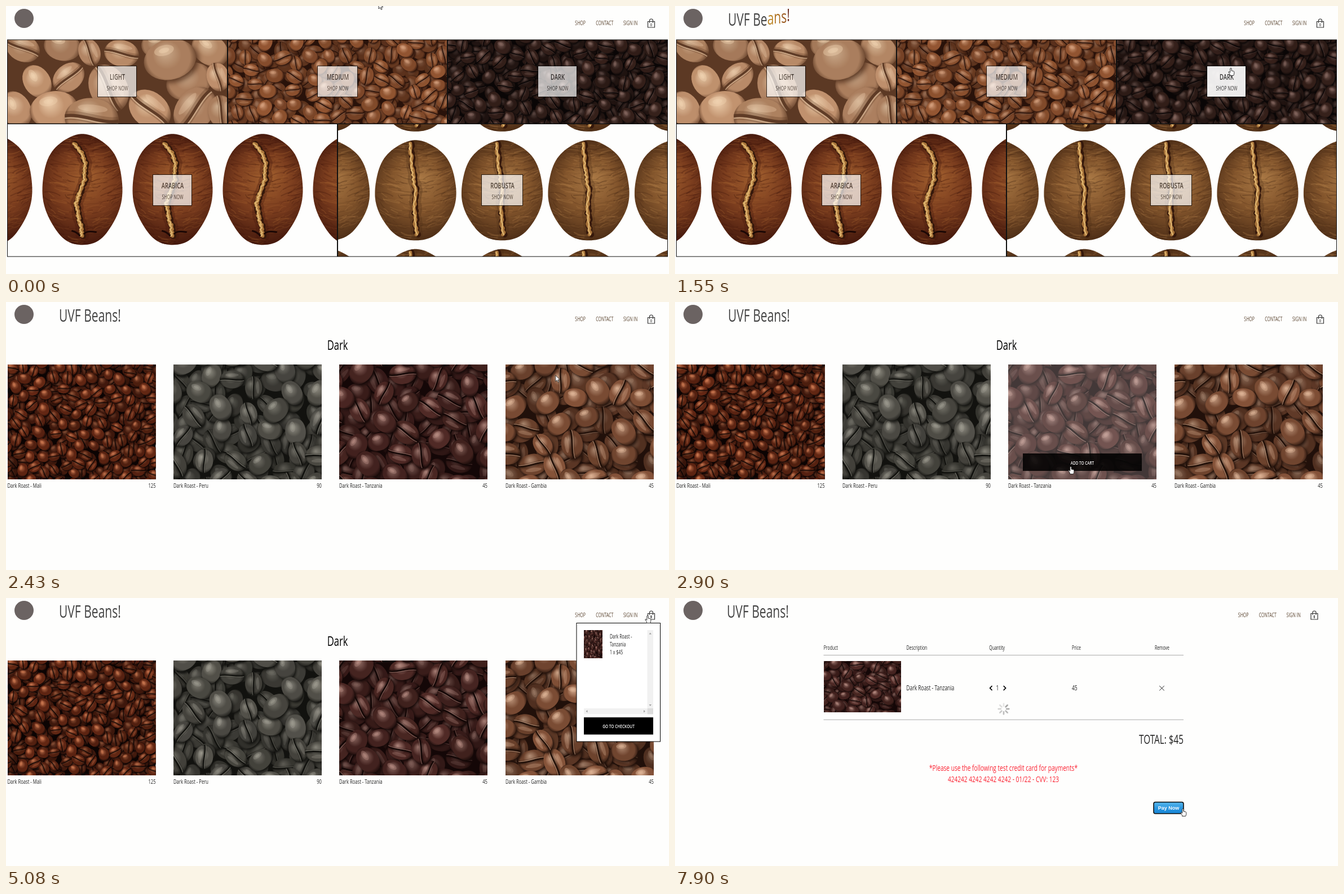
Animation, 1176 px wide and 476 px high, one loop 7.99 s. Source, as an HTML page with a canvas:

```html
<!DOCTYPE html>
<html lang="en">
<head>
<meta charset="utf-8">
<title>Coffee shop</title>
<style>
  html, body { margin: 0; width: 100%; height: 100%; overflow: hidden; background: #fefefd; }
  #stage { position: relative; width: 1176px; height: 476px; overflow: hidden; font-family: "Open Sans", sans-serif; --loop: 7990ms; }
  #stage > *, .scene > * { position: absolute; left: 0; top: 0; }
  svg { display: block; overflow: visible; }
  .scene { width: 1176px; height: 476px; }
  .hard { animation: var(--name) var(--loop) step-end infinite; }

  #home { --name: home; } #load { --name: load; } #shop { --name: shop; } #cart { --name: cart; }
  @keyframes home { 0% { opacity: 1 } 22.7%, 100% { opacity: 0 } }
  @keyframes load { 0% { opacity: 0 } 22.7% { opacity: 1 } 29.4%, 100% { opacity: 0 } }
  @keyframes shop { 0% { opacity: 0 } 29.4% { opacity: 1 } 70.5%, 100% { opacity: 0 } }
  @keyframes cart { 0% { opacity: 0 } 70.5%, 100% { opacity: 1 } }

  #home .dark { left: 784px; top: 60px; width: 389px; height: 149px; overflow: hidden; }
  .dark canvas { animation: zoom var(--loop) linear infinite; }
  @keyframes zoom { 0%, 13% { transform: none } 22.7%, 100% { transform: scale(1.025) } }
  .tag { opacity: .7; }
  .tag.hot { --name: tag; }
  @keyframes tag { 0% { opacity: .7 } 13%, 100% { opacity: .92 } }

  .ring { transform-origin: 588px 234.5px; animation: spin 998.75ms -37ms linear infinite; }
  .spokes { transform-origin: 583px 197px; animation: spin 998.75ms steps(8) infinite; }
  @keyframes spin { to { transform: rotate(360deg) } }

  .buy { --name: buy; }
  @keyframes buy { 0% { opacity: 0 } 32.6% { opacity: 1 } 44.3%, 100% { opacity: 0 } }
  #menu { --name: menu; }
  @keyframes menu { 0% { opacity: 0 } 55.2%, 100% { opacity: 1 } }
  #menu canvas { position: absolute; left: 1025px; top: 57px; }
  .paid { --name: paid; }
  @keyframes paid { 0% { opacity: 0 } 94%, 100% { opacity: 1 } }
  .none { --name: none; } .one { --name: one; }
  @keyframes none { 0% { opacity: 1 } 38.2%, 100% { opacity: 0 } }
  @keyframes one { 0% { opacity: 0 } 38.2%, 100% { opacity: 1 } }

  #nav { --name: nav; }
  @keyframes nav { 0% { transform: none } 70.5%, 100% { transform: translateX(-10.5px) } }
  #name { left: 94px; top: 1px; font-size: 30.5px; line-height: 44px; color: #444; white-space: pre;
    transform: scaleX(.69); transform-origin: 0 0; --name: name; }
  @keyframes name { 0% { opacity: 0; left: 94px } 9.14% { opacity: 1; left: 94px } 70.5%, 100% { opacity: 1; left: 91.5px } }
  #name span { display: inline-block; animation: drop var(--loop) calc(var(--i) * 80ms) linear infinite backwards; }
  @keyframes drop {
    0%, 9.14% { opacity: 0; color: #501410; transform: translateY(-10px) }
    10.4% { opacity: 1; color: #6a2a1c; transform: translateY(-8px) }
    11.6% { color: #a5631f; transform: translateY(-5px) }
    13.4% { color: #bd8526; transform: translateY(-2px) }
    14.4%, 100% { opacity: 1; color: #444; transform: none }
  }

  #cursor { animation: move var(--loop) ease-in-out infinite; }
  @keyframes move {
    0%, .9% { transform: translate(661px, -6px) }
    10.5% { transform: translate(985px, 34px) }
    16.3% { transform: translate(986px, 105px) }
    19.4% { transform: translate(986px, 110px) }
    21.9%, 29.6% { transform: translate(985px, 124px) }
    35.7%, 42.2% { transform: translate(702px, 292px) }
    53.4%, 63.8% { transform: translate(1138px, 31px) }
    69.4%, 78.5% { transform: translate(1098px, 225px) }
    88.2%, 89.2% { transform: translate(915px, 397px) }
    93.2%, 100% { transform: translate(901px, 374px) }
  }
  .arrow { --name: arrow; } .hand { --name: hand; }
  @keyframes arrow {
    0%, 22.4%, 43%, 64.3%, 70.5% { opacity: 1 }
    13%, 34.6%, 52.3%, 67.8%, 92%, 100% { opacity: 0 }
  }
  @keyframes hand {
    0%, 22.4%, 43%, 64.3%, 70.5% { opacity: 0 }
    13%, 34.6%, 52.3%, 67.8%, 92%, 100% { opacity: 1 }
  }
</style>
</head>
<body>
<div id="stage">
  <div id="home" class="scene hard">
    <canvas width="1176" height="476"></canvas>
    <div class="dark"><canvas width="389" height="149"></canvas></div>
  </div>
  <div id="load" class="scene hard"></div>
  <div id="shop" class="scene hard">
    <canvas width="1176" height="476"></canvas>
  </div>
  <div id="cart" class="scene hard">
    <canvas width="1176" height="476"></canvas>
  </div>
  <div id="head" class="scene"></div>
  <div id="name" class="hard"></div>
  <svg id="cursor" width="20" height="20" fill="#fff" stroke="#222" stroke-width=".9" stroke-linejoin="round">
    <path class="arrow hard" d="M0 0V11L2.6 8.7L4.4 12.5L6.1 11.7L4.4 8H7.8Z"/>
    <path class="hand hard" d="M-1.5 13.5V11.5L-4 8Q-4.6 6.4-3 6.7L-1.2 8.2V1Q0-.8 1.1 1V5L4.8 5.8Q5.8 6 5.8 7.2V10.2L4.8 13.5Z"/>
  </svg>
</div>
<script>
const $ = q => document.querySelector(q);
const random = seed => () => (seed = seed * 16807 % 2147483647) / 2147483647;

// ---- coffee beans ----
const tone = (lite, mid, deep) => ({ lite, mid, deep });
const tones = {
  light: tone('#f0d2b0', '#c39470', '#5c3924'),
  medium: tone('#d49f7c', '#945632', '#2a120a'),
  dark: tone('#84675f', '#38221c', '#0a0606'),
  mali: tone('#cc7850', '#662814', '#0d0403'),
  peru: tone('#9c998e', '#55534c', '#12120f'),
  tanzania: tone('#b58a80', '#502a26', '#140807'),
  gambia: tone('#deb496', '#87543a', '#22110a'),
  arabica: tone('#a2602f', '#7b3d1e', '#3f150b'),
  robusta: tone('#ab7a46', '#83552c', '#4a2b15')
};

function bean(c, x, y, len, angle, p, rnd, wide = .74) {
  const w = len / 2, h = w * wide, cos = Math.cos(angle), sin = Math.sin(angle);
  const lx = (-.3 * cos - .45 * sin) * h, ly = (.3 * sin - .45 * cos) * h;
  const shade = c.createRadialGradient(lx, ly, 0, 0, 0, w * 1.08);
  shade.addColorStop(0, p.lite);
  shade.addColorStop(.5, p.mid);
  shade.addColorStop(.75, p.mid);
  shade.addColorStop(1, p.deep);
  c.save();
  c.translate(x, y);
  c.rotate(angle);
  c.shadowColor = p.deep;
  c.shadowBlur = len * .1;
  c.shadowOffsetX = c.shadowOffsetY = len * .05;
  c.beginPath();
  c.ellipse(0, 0, w, h, 0, 0, 7);
  c.fillStyle = shade;
  c.fill();
  c.shadowColor = 'transparent';
  c.globalAlpha = rnd() * .3;
  c.fillStyle = p.deep;
  c.fill();
  c.clip();
  const shine = (sx, sy, rx, ry, alpha) => {
    c.globalAlpha = alpha;
    c.fillStyle = p.lite;
    c.beginPath();
    c.ellipse(sx, sy, rx, ry, 0, 0, 7);
    c.fill();
  };
  if (rnd() < .55) {
    const bend = h * (rnd() < .5 ? .22 : -.22);
    const crease = (dy, width, color, alpha) => {
      c.beginPath();
      c.moveTo(-w, dy);
      c.bezierCurveTo(-w * .4, bend + dy, w * .4, dy - bend, w, dy);
      c.lineWidth = width;
      c.strokeStyle = color;
      c.globalAlpha = alpha;
      c.stroke();
    };
    shine(0, -h * .5, w * .55, h * .18, .3);
    crease(0, len * .17, p.deep, .3);
    crease(0, len * .06, p.deep, .95);
    crease(len * .045, len * .025, p.lite, .55);
  } else {
    shine(lx, ly, w * .38, h * .26, .4);
    shine(lx, ly, w * .2, h * .12, .5);
  }
  c.restore();
}

function framed(c, x, y, w, h, fill, draw) {
  c.save();
  c.beginPath();
  c.rect(x, y, w, h);
  c.clip();
  c.fillStyle = fill;
  c.fillRect(x, y, w, h);
  draw();
  c.restore();
}

function pile(c, x, y, w, h, len, p, seed) {
  const rnd = random(seed * 7919);
  const layer = gap => {
    const spots = [];
    for (let n = 50 * w * h / len / len; n > 0; n--) {
      const sx = x - len / 2 + rnd() * (w + len), sy = y - len / 2 + rnd() * (h + len);
      if (spots.some(s => Math.hypot(s[0] - sx, s[1] - sy) < gap * len)) continue;
      spots.push([sx, sy]);
      bean(c, sx, sy, len * (.9 + rnd() * .25), rnd() * 6.3, p, rnd);
    }
  };
  framed(c, x, y, w, h, p.deep, () => {
    layer(.6);
    c.globalAlpha = .35;
    c.fillStyle = p.deep;
    c.fillRect(x, y, w, h);
    c.globalAlpha = 1;
    layer(.8);
  });
}

// egg narrows the lower end
function bigBean(c, x, y, w, h, p, crease, egg = 0) {
  const rnd = random(424242);
  const shade = c.createRadialGradient(w * .1, -h * .25, 0, 0, 0, h * 1.05);
  shade.addColorStop(0, p.lite);
  shade.addColorStop(.5, p.mid);
  shade.addColorStop(1, p.deep);
  c.save();
  c.translate(x, y);
  c.beginPath();
  for (let a = 0; a < 6.28; a += .06) {
    const r = 1 + .008 * Math.sin(a * 7);
    c.lineTo(w * r * Math.cos(a) * (1 - egg * Math.sin(a)), h * r * Math.sin(a));
  }
  c.closePath();
  c.clip();
  c.fillStyle = shade;
  c.fillRect(-w * 1.1, -h * 1.1, w * 2.2, h * 2.2);
  for (let i = 0; i < 420; i++) {
    const wx = (rnd() * 2 - 1) * w, wy = (rnd() * 2 - 1) * h, l = 3 + rnd() * 13, dip = rnd() * 8 - 4;
    c.globalAlpha = .1 + rnd() * .25;
    c.strokeStyle = i % 2 ? p.deep : p.lite;
    c.lineWidth = .6 + rnd() * 1.8;
    c.beginPath();
    c.moveTo(wx - l, wy + dip + wx * .08);
    c.quadraticCurveTo(wx, wy - dip, wx + l, wy + dip * .4 - wx * .08);
    c.stroke();
  }
  c.lineCap = c.lineJoin = 'round';
  const seam = (width, color, dx, rough, alpha = 1) => {
    c.beginPath();
    crease.slice(1).forEach(([bx, by], i) => {
      const [ax, ay] = crease[i];
      for (let t = 0; t < 1; t += .1)
        c.lineTo(ax + (bx - ax) * t + dx + (rnd() - .5) * rough, ay + (by - ay) * t);
    });
    c.globalAlpha = alpha;
    c.lineWidth = width;
    c.strokeStyle = color;
    c.stroke();
  };
  seam(20, p.deep, 1, 4, .3);
  seam(10, '#35180b', 1, 4);
  seam(6, '#a8743a', 0, 4);
  seam(2.5, '#dcb16c', -1, 4);
  if (egg) {
    c.strokeStyle = '#1c0805';
    c.lineWidth = 3;
    c.beginPath();
    c.moveTo(-18, 73);
    c.quadraticCurveTo(-10, 75, -5, 81);
    c.moveTo(3, 78);
    c.quadraticCurveTo(8, 72, 24, 75);
    c.stroke();
  }
  c.restore();
}

const canvas = q => $(q).getContext('2d');
const home = canvas('#home > canvas'), shop = canvas('#shop canvas'), cart = canvas('#cart canvas');

// x, y, length, angle
const lightBeans = [
  [30, 75, 62, .4], [100, 72, 66, .2], [148, 82, 50, 1.2], [205, 84, 62, .2], [270, 70, 60, 0],
  [362, 78, 70, .6], [182, 146, 88, 1.1], [325, 134, 84, -.4], [376, 126, 52, 1.3], [18, 184, 68, 1.1],
  [55, 134, 62, 1], [111, 127, 62, -.7], [291, 95, 94, -.25], [85, 184, 86, -.15], [255, 184, 82, .7],
  [152, 200, 96, .1], [335, 184, 88, -.9], [382, 188, 60, 1.4]
];
framed(home, 3, 60, 389, 149, tones.light.deep, () => {
  const rnd = random(90001);
  for (const [x, y, len, angle] of lightBeans) bean(home, x, y, len, angle, tones.light, rnd, .76);
});
pile(home, 394, 60, 388, 149, 29, tones.medium, 5);
pile(canvas('.dark canvas'), 0, 0, 389, 149, 28, tones.dark, 8);
framed(home, 3, 210, 584, 235, '#fefefd', () => {
  const crease = [[-14, -82], [-2, -66], [5, -48], [4, -18], [-5, 6], [-11, 24], [-8, 46], [-3, 62], [-1, 82]];
  for (let i = -1; i < 4; i++) bigBean(home, 135.5 + 160 * i, 326.5, 71, 98.5, tones.arabica, crease, .05);
});
framed(home, 589, 210, 584, 235, '#fefefd', () => {
  const crease = [[-9, -84], [-6, -40], [0, 0], [-2, 40], [2, 78]];
  for (let i = -1; i < 4; i++)
    for (let j = -1; j < 2; j++)
      bigBean(home, 726.5 + 153.5 * i, 328 + 193.5 * j, 72, 89, tones.robusta, crease);
});

pile(shop, 3, 111, 262.5, 204, 23, tones.mali, 11);
pile(shop, 297, 111, 263, 204, 45, tones.peru, 14);
pile(shop, 591, 111, 263, 204, 45, tones.tanzania, 17);
pile(shop, 886, 111, 263, 204, 47, tones.gambia, 23);
cart.drawImage(shop.canvas, 591, 111, 263, 204, 263.5, 111.5, 137.5, 91.5);

// ---- text and controls ----
// one shared factor gives the condensed cut of the typeface
const text = (x, y, size, str, { anchor = 'start', weight = 400, fill = '#222', cls = '' } = {}) =>
  `<text class="${cls}" transform="translate(${x} ${y}) scale(.69 1)" font-size="${size}" text-anchor="${anchor}" font-weight="${weight}" fill="${fill}">${str}</text>`;
const rect = (x, y, w, h, attrs) => `<rect x="${x}" y="${y}" width="${w}" height="${h}" ${attrs}/>`;
const line = (d, color, width = 1) => `<path d="${d}" fill="none" stroke="${color}" stroke-width="${width}"/>`;
const middle = { anchor: 'middle' };
const svg = (q, ...parts) => $(q).insertAdjacentHTML('beforeend', `<svg width="1176" height="476">${parts.join('')}</svg>`);

const tag = (x, y, w, title, cls = '') => `<g class="tag ${cls}">
  ${rect(x - .5, y - .5, w, 55, 'fill="#fff" stroke="#000"')}
  ${text(x + w / 2, y + 24.3, 13.6, title, { ...middle, weight: 600, fill: '#3a3a3a' })}
  ${text(x + w / 2, y + 42.5, 10.2, 'SHOP NOW', { ...middle, fill: '#3a3a3a' })}</g>`;
const tile = (x, y, w, h) => rect(x, y, w, h, 'fill="none" stroke="#111"');
svg('#home',
  tile(2.5, 60, 390, 149), tile(393.5, 60, 389, 149), tile(783.5, 60, 390, 149),
  tile(2.5, 209.5, 585, 235.5), tile(588.5, 209.5, 585, 235.5),
  tag(163, 107, 69, 'LIGHT'), tag(553, 107, 71, 'MEDIUM'), tag(944, 107, 69, 'DARK', 'hot hard'),
  tag(261, 300, 69, 'ARABICA'), tag(844, 300, 73, 'ROBUSTA'));

svg('#load', `<g class="ring"><circle cx="588" cy="234.5" r="14.5" fill="none" stroke="#d8d6d6" stroke-width="2"/>
  ${line('M577.75 224.25A14.5 14.5 0 0 1 598.25 224.25', '#636767', 2)}</g>`);

const product = (x, name, price) =>
  text(x, 330, 11.1, 'Dark Roast - ' + name) + text(x + 263, 330, 11.1, price, { anchor: 'end' });
svg('#shop',
  text(588, 85, 24, 'Dark', { ...middle, fill: '#000' }),
  product(2.5, 'Mali', 125), product(297, 'Peru', 90), product(591, 'Tanzania', 45), product(886, 'Gambia', 45),
  `<g class="buy hard">${rect(591, 111, 263, 204, 'fill="#fff" opacity=".2"')}
  ${rect(617, 269, 211, 31, 'fill="#000" opacity=".86"')}
  ${text(722.5, 289, 9.3, 'ADD TO CART', { ...middle, weight: 600, fill: '#fff' })}</g>`);

$('#shop').insertAdjacentHTML('beforeend', '<div id="menu" class="hard"></div>');
svg('#menu',
  rect(1012, 44.5, 148.5, 210.5, 'fill="#fff" stroke="#000"'),
  text(1071, 72, 10.1, 'Dark Roast -'), text(1071, 86, 10.1, 'Tanzania'), text(1071, 100, 10.1, '1 x $45'),
  rect(1137.5, 57, 10.5, 139, 'fill="#f1f1f1"'), rect(1025, 196, 112.5, 10.5, 'fill="#f1f1f1"'),
  rect(1137.5, 196, 10.5, 10.5, 'fill="#dcdcdc"'),
  '<path fill="#a3a3a3" d="M1140.5 64.5h4.5l-2.2-3zM1140.5 189h4.5l-2.2 3zM1031.5 199v4.5l-3-2.2zM1131 199v4.5l3-2.2z"/>',
  rect(1025, 212, 123, 30.5, ''),
  text(1086.5, 231, 9.5, 'GO TO CHECKOUT', { ...middle, weight: 600, fill: '#fff' }));
$('#menu').insertAdjacentHTML('beforeend', '<canvas width="33" height="50"></canvas>');
canvas('#menu canvas').drawImage(shop.canvas, 591, 111, 263, 204, 0, 0, 33, 50);

const heads = ['Product', 'Description', 'Quantity', 'Price', 'Remove'];
const red = { ...middle, fill: '#fb2030' };
const spokes = [...Array(8)].map((_, i) =>
  `<path d="M588 197h4.5" transform="rotate(${i * 45} 583 197)" stroke="#777" stroke-width="2.4" stroke-linecap="round" opacity="${.75 - i * .08}"/>`);
svg('#cart',
  ...heads.map((h, i) => text(263.7 + 146.8 * i, 92, 10, h)),
  line('M263.5 101.5H902M263.5 216.2H902', '#aaa'),
  text(410.3, 164, 12.3, 'Dark Roast - Tanzania'), text(569.5, 164, 12.3, 1), text(704, 164, 12.3, 45),
  line('M562.5 156L558.7 160L562.5 164M582.7 156L586.5 160L582.7 164', '#000', 1.8),
  line('M859.2 156L867.8 164.4M867.8 156L859.2 164.4', '#222'),
  text(902, 258.7, 22.2, 'TOTAL: $45', { anchor: 'end' }),
  text(582.5, 307, 14.7, '*Please use the following test credit card for payments*', red),
  text(582.5, 327.3, 14.7, '424242 4242 4242 4242 - 01/22 - CVV: 123', red),
  '<linearGradient id="blue" x2="0" y2="1"><stop stop-color="#58b7ec"/><stop offset=".5" stop-color="#2b97e0"/><stop offset="1" stop-color="#1685d6"/></linearGradient>',
  rect(849.5, 363, 52, 19.5, 'rx="3" fill="url(#blue)" stroke="#2280bf" stroke-width=".8"'),
  '<text x="875.5" y="376" font-family="Liberation Sans, Arial, sans-serif" font-size="9" font-weight="700" fill="#fff" text-anchor="middle">Pay Now</text>',
  `<g class="paid hard">${rect(849, 362.5, 53, 20.5, 'rx="3" fill="none" stroke="#111" stroke-width="1.6"')}
  <g class="spokes">${spokes.join('')}</g></g>`);

const ink = { fill: '#5c4632' }, count = cls => ({ ...middle, weight: 600, cls: cls + ' hard' });
svg('#head',
  '<circle cx="32" cy="22" r="17" fill="#6b6362"/>',
  '<g id="nav" class="hard">',
  text(1009.3, 34.3, 10.2, 'SHOP', ink), text(1046.3, 34.3, 10.2, 'CONTACT', ink), text(1095, 34.3, 10.2, 'SIGN IN', ink),
  line('M1138.5 27.5H1150.5V38H1138.5ZM1141.5 30V26A3 3 0 0 1 1147.5 26V30', '#333', 1.2),
  text(1144.5, 35.8, 7, 0, count('none')), text(1144.5, 35.8, 7, 1, count('one')),
  '</g>');

$('#name').innerHTML = [...'UVF Beans!'].map((ch, i) => `<span style="--i:${i}">${ch}</span>`).join('');

// start every part on the same tick
const now = document.timeline.currentTime;
document.getAnimations().forEach(a => a.startTime = now);
</script>
</body>
</html>
```
